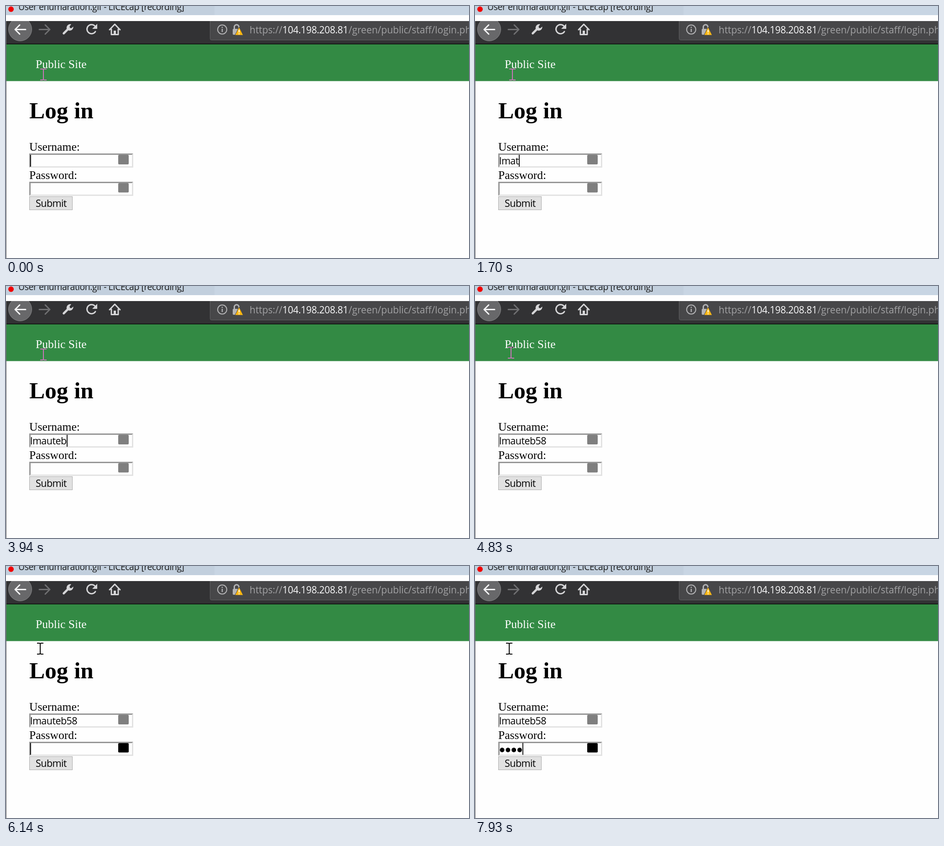
An HTML page for the animation above (8 s loop, 1015 px wide and 552 px high).

```html
<!DOCTYPE html>
<html lang="en">
<head>
<meta charset="utf-8">
<title>Log in</title>
<style>
  html, body { margin: 0; width: 100%; height: 100%; overflow: hidden; background: #fefefe; }
  svg { display: block; width: 1015px; height: 552px; }
  text { white-space: pre; }
  .serif { font: 25.6px "Liberation Serif", serif; }
  .head { font: bold 51.2px "Liberation Serif", serif; }
  .ui { font: 21.5px "Open Sans", sans-serif; letter-spacing: -.55px; }
  .title { font: 19.5px "Open Sans", sans-serif; letter-spacing: -.5px; }
  .url { font: 21px "Open Sans", sans-serif; fill: #a2a2a4; }
  .host { fill: #f9f9fa; letter-spacing: -.33px; }
  .line { fill: none; stroke: #d6d6d8; stroke-width: 3; stroke-linecap: round; stroke-linejoin: round; }
  #pointer { fill: none; stroke: #fff; stroke-width: 2; mix-blend-mode: difference; }
</style>
</head>
<body>
<svg viewBox="0 0 1015 552">
  <defs>
    <g id="field">
      <path fill="#969696" d="M51 0H279L276 3H54V28L51 31Z"/>
      <path fill="#e3e3e3" d="M279 0V31H51L54 28H276V3Z"/>
    </g>
    <clipPath id="bar"><rect y="33" width="1015" height="51"/></clipPath>
  </defs>

  <rect width="1015" height="552" fill="#fefefe"/>

  <!-- window title -->
  <rect width="457" height="20" fill="#c2cfdd"/>
  <rect x="457" width="558" height="20" fill="#c8d5e3"/>
  <circle cx="11" cy="7" r="6" fill="#f00000"/>
  <text class="title" x="27" y="9" fill="#1c1c1c">User enumaration.gif - LICEcap [recording]</text>

  <!-- browser toolbar -->
  <g clip-path="url(#bar)">
    <rect y="33" width="1015" height="50" fill="#323234"/>
    <rect y="82.5" width="1015" height="1.5" fill="#0c0c0d"/>
    <circle cx="31" cy="51" r="25.5" fill="#68686a" stroke="#858587"/>
    <path class="line" stroke-width="3.2" style="stroke:#f4f4f5" d="M43 51.5H20M30 41.5L20 51.5L30 61.5"/>
    <path class="line" style="stroke:#6f6f71" d="M73 51.5H96M86 41.5L96 51.5L86 61.5"/>
    <path class="line" style="stroke-width:4.6" d="M126.5 60L136 50.5"/>
    <path fill="#d6d6d8" d="M143 40L139.5 44.5L140 48L143.500 48.500L147.500 45A8 8 0 0 1 137 53.500L133 49.500A8 8 0 0 1 143 40Z"/>
    <path class="line" d="M196 56A10 10 0 1 1 194.500 43.500"/>
    <path fill="#d6d6d8" d="M200 39V50H189Z"/>
    <path class="line" d="M227 52L238.500 40L250 52M231 51V62.500H246V51"/>
    <rect x="236" y="54" width="5" height="9" fill="#d6d6d8"/>
    <rect x="447.500" y="20" width="600" height="54.500" rx="3" fill="#474749" stroke="#626264"/>
    <circle cx="474" cy="51.500" r="10" fill="none" stroke="#b4b4b6" stroke-width="2"/>
    <path stroke="#b4b4b6" stroke-width="2.400" d="M474 45.500V48M474 50V57"/>
    <path fill="none" stroke="#b4b4b6" stroke-width="3" d="M500.500 51V46A5 5 0 0 1 510.500 46V51"/>
    <rect x="497" y="50" width="17" height="13" rx="2" fill="#b4b4b6"/>
    <path fill="#fdb914" stroke="#474749" stroke-width="1" stroke-linejoin="round" d="M511 46L520 64H502Z"/>
    <path stroke="#fff" stroke-width="2" d="M511 52V58M511 60V62"/>
    <text class="url" y="60"><tspan x="534">https://</tspan><tspan class="host" x="606">104.198.208.81</tspan><tspan x="751">/green/public/staff/login.php</tspan></text>
  </g>

  <!-- page -->
  <rect y="84" width="1015" height="80.500" fill="#338a44"/>
  <rect y="33" width="1" height="519" fill="#69696b"/>
  <g class="serif">
    <text x="65" y="136" fill="#fff">Public Site</text>
    <text x="51" y="317">Username:</text>
    <text x="51" y="379">Password:</text>
  </g>
  <text class="head" x="51" y="246">Log in</text>
  <use href="#field" y="323"/>
  <use href="#field" y="385"/>
  <rect x="246" y="326" width="23" height="21" rx="2" fill="#7f7f7f"/>
  <rect id="badge" x="246" y="388" width="23" height="20.500" rx="2"/>
  <rect x="51.500" y="417.500" width="94" height="29" fill="#e1e1e1" stroke="#adadad"/>
  <text class="ui" x="65" y="440">Submit</text>

  <text class="ui" id="user" x="53" y="347"></text>
  <g id="dots"></g>
  <rect id="caret" width="1.800" height="26"/>
  <path id="pointer" d="M-7 -12H-2L0 -11L2 -12H7M0 -11V11M-7 12H-2L0 11L2 12H7"/>
</svg>
<script>
  const LOOP = 8000, LEFT = 53, DOT = 12.8;
  const NAME = 'lmauteb58';
  const $ = id => document.getElementById(id);
  const user = $('user'), dots = $('dots'), caret = $('caret'), pointer = $('pointer'), badge = $('badge');

  // Each step changes only the listed parts; caret: 'u' username, 'p' password, '' hidden.
  const typed = (n, extra = '') => ({ text: NAME.slice(0, n) + extra, caret: 'u' });
  const off = { caret: '' }, on = { caret: 'u' };
  const steps = [
    [0, { text: '', dots: 0, caret: 'u', at: [82, 150], badge: '#7f7f7f' }],
    [150, off],
    [610, on],
    [930, typed(1)],
    [1230, typed(2)],
    [1380, typed(3)],
    [1700, typed(3, 't')],
    [2160, off],
    [2310, typed(3)],
    [2610, typed(4)],
    [2740, typed(5)],
    [2890, typed(6)],
    [3350, off],
    [3790, on],
    [3940, typed(7)],
    [4240, typed(8)],
    [4390, typed(9)],
    [4830, { caret: '', at: [79, 146] }],
    [4980, { at: [64, 157] }],
    [5130, { at: [68, 173], badge: '#000' }],
    [5280, { at: [75, 180] }],
    [5430, { at: [75, 181] }],
    [6020, on],
    [6140, { caret: 'p' }],
    [6600, off],
    [7190, { dots: 1 }],
    [7340, { dots: 2, caret: 'p' }],
    [7630, { dots: 3, caret: '' }],
    [7930, { dots: 4, caret: 'p' }]
  ];

  const states = [];
  for (const [, change] of steps) states.push({ ...states[states.length - 1], ...change });

  for (let i = 0; i < 4; i++) {
    const c = document.createElementNS('http://www.w3.org/2000/svg', 'circle');
    c.setAttribute('cx', 59.5 + i * DOT);
    c.setAttribute('cy', 403);
    c.setAttribute('r', 5);
    dots.append(c);
  }

  function show(s) {
    user.textContent = s.text;
    [...dots.children].forEach((c, i) => c.setAttribute('visibility', i < s.dots ? 'visible' : 'hidden'));
    const inPass = s.caret === 'p';
    const width = inPass ? s.dots * DOT : s.text ? user.getComputedTextLength() : 0;
    caret.setAttribute('x', LEFT + Math.round(width));
    caret.setAttribute('y', inPass ? 387.5 : 326);
    caret.setAttribute('visibility', s.caret ? 'visible' : 'hidden');
    pointer.setAttribute('transform', `translate(${s.at})`);
    badge.setAttribute('fill', s.badge);
  }

  const start = performance.now();
  let last = -1;
  function tick() {
    const t = (performance.now() - start) % LOOP;
    let i = steps.length - 1;
    while (steps[i][0] > t) i--;
    if (i !== last) show(states[last = i]);
    requestAnimationFrame(tick);
  }
  tick();
</script>
</body>
</html>
```
